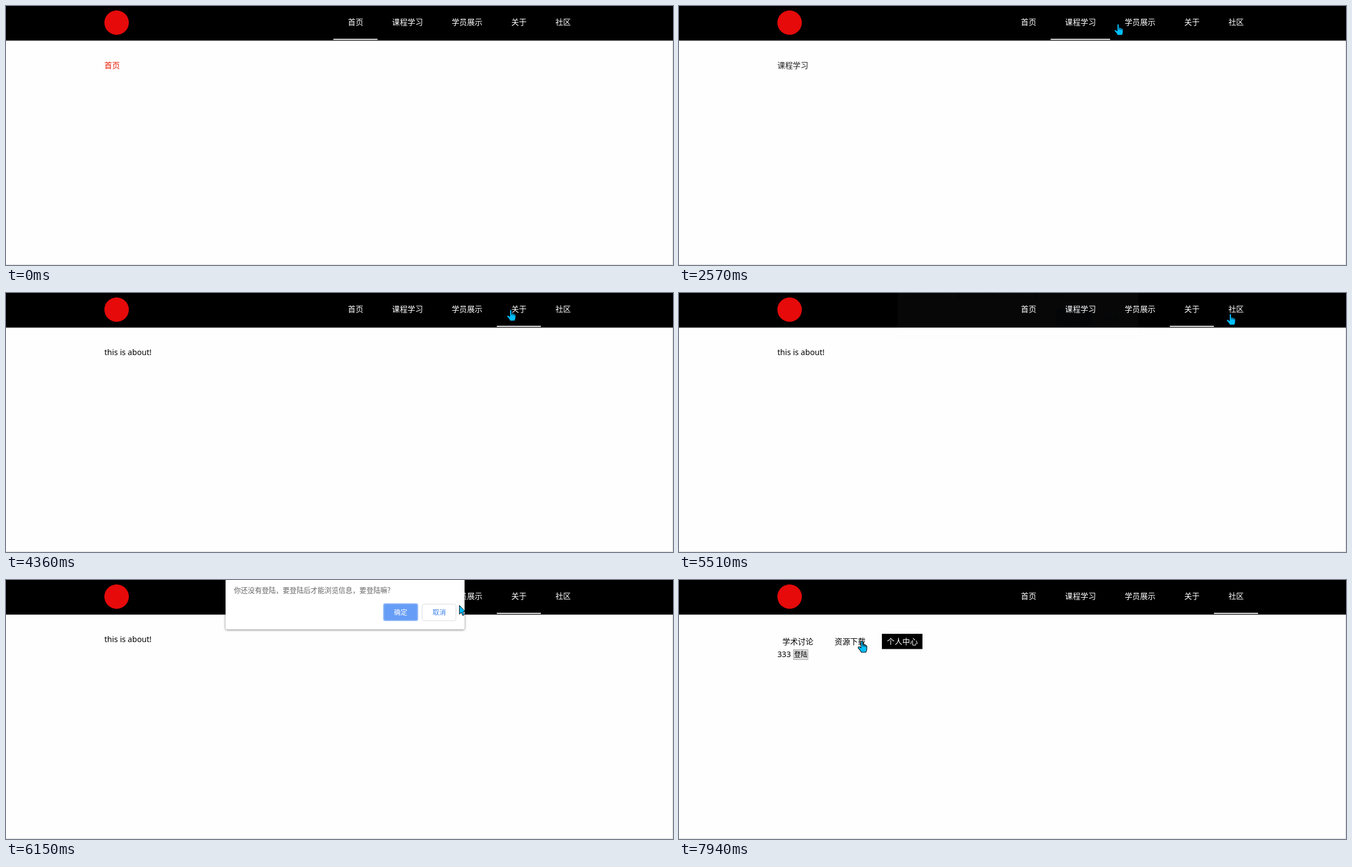
Animation, 1200 px wide and 467 px high, one loop 8 s. Source, as an HTML page:

```html
<!DOCTYPE html>
<html lang="zh-CN">
<head>
<meta charset="utf-8">
<style>
  html, body { margin: 0; width: 100%; height: 100%; overflow: hidden; background: #fefefe; }
  #stage { position: fixed; inset: 0; overflow: hidden; contain: strict; }
  svg { position: absolute; left: 0; top: 0; width: 100%; height: 100%; overflow: hidden; }
  text { font: 14.15px "Noto Sans", "Noto Sans CJK SC", sans-serif; }
  .cjk { font: 13.9px "Noto Sans CJK SC", "Noto Sans CJK", sans-serif; }
  .small { font-size: 12px; }
  .ask { font-size: 12.55px; }
  #dialog { height: 100px; transform-origin: 610px 0; }
  #panel { filter: drop-shadow(0 1px 2px rgba(0, 0, 0, .5)); }
</style>
</head>
<body>
<div id="stage">
<svg>
  <path d="M1199.5 62V466.5H0" fill="none" stroke="#d9d9d9"/>
  <rect width="1200" height="62.4"/>
  <circle cx="199" cy="30" r="22" fill="#e60a0a"/>
  <g id="nav" fill="#fff"></g>
  <rect id="line" y="59.2" height="1.9" fill="#fff"/>
  <g class="page"><text class="cjk" x="177" y="111.5" fill="#e81800">首页</text></g>
  <g class="page"><text class="cjk" x="177" y="111.5" fill="#222">课程学习</text></g>
  <g class="page"><text class="cjk" x="177" y="111.5" fill="#222">学员展示</text></g>
  <g class="page"><text x="177" y="111.5">this is about!</text></g>
  <g class="page">
    <rect x="365" y="97" width="73" height="27.5"/>
    <text class="cjk" x="186" y="116">学术讨论</text>
    <text class="cjk" x="280" y="116">资源下载</text>
    <text class="cjk" x="374" y="116" fill="#fff">个人中心</text>
    <text x="177" y="139">333</text>
    <rect x="206" y="125.5" width="26" height="18" fill="#dedede" stroke="#a6a6a6"/>
    <text class="cjk small" x="207" y="139">登陆</text>
  </g>
</svg>
<svg id="dialog">
  <rect id="panel" x="395" y="-30" width="430" height="119" rx="3" fill="#fff"/>
  <text class="cjk ask" x="410" y="23" fill="#666">你还没有登陆，要登陆后才能浏览信息，要登陆嘛?</text>
  <rect x="679.5" y="43" width="61" height="30" rx="3" fill="#669df6" stroke="#8db5f8" stroke-width="2"/>
  <text class="cjk small" x="698" y="63.3" fill="#fff">确定</text>
  <rect x="748.5" y="43.5" width="61" height="30" rx="3" fill="#fff" stroke="#dadce0"/>
  <text class="cjk small" x="767.5" y="63.3" fill="#3b82ea">取消</text>
</svg>
<svg>
  <g id="cursor" fill="#00bfff" stroke="#000" stroke-linejoin="round">
    <circle id="halo" r="12" fill="#ff0" fill-opacity=".47" stroke="none"/>
    <path id="arrow" d="M.5 .5V16.5L4 13.2L6.4 18.8L9 17.6L6.7 12H11.2Z"/>
    <g id="hand" transform="scale(1.06)">
      <path d="M-1.6 1.6Q0 -.6 1.6 1.6V6.4Q3.2 5.4 4 7.2Q5.8 6.3 6.4 8.2Q8.5 7.6 8.5 10V14Q8.5 17 6.8 19.5H-1Q-2.5 16 -6 12.8Q-7 10.6 -4.8 10.2Q-3 10.6 -1.6 12.2Z"/>
      <path d="M1.6 6V10M4 7.2V10.4M6.4 8.2V10.8" fill="none" stroke-width=".8"/>
    </g>
  </g>
</svg>
</div>
<script>
const LOOP = 8000, STEP = 74;   // pointer and page update in discrete steps
const DIALOG = { open: 5510, shut: 7250, gone: 7320 };
const $ = id => document.getElementById(id);
const pages = [...document.querySelectorAll('.page')];
const pageStarts = [0, 1870, 3030, 4360, 7160];

let left = 589;
const tabs = ['首页', '课程学习', '学员展示', '关于', '社区'].map(label => {
  const tab = { x: left, width: 51.8 + 13.85 * label.length };
  const text = document.createElementNS('http://www.w3.org/2000/svg', 'text');
  text.setAttribute('class', 'cjk');
  text.setAttribute('x', left + 26);
  text.setAttribute('y', 34);
  text.textContent = label;
  $('nav').append(text);
  left += tab.width;
  return tab;
});

// Each leg runs from the previous stop to its own; via bends it, press is a click
const legs = [
  { at: 300, n: 2, from: [966, 324], to: [890, 184] },
  { at: 620, n: 1, to: [821, 148] },
  { at: 840, n: 7, to: [702, 43], via: [650, 70], press: [1540, 1790] },
  { at: 2200, n: 6, to: [790, 32], press: [2800, 3030] },
  { at: 3510, n: 6, to: [908, 29.5], press: [4120, 4270] },
  { at: 4670, n: 6, to: [992, 37], press: [5300, 5510] },
  { at: 5990, n: 10, to: [736.5, 59], via: [626, 52], power: 1, press: [6930, 7080] },
  { at: 7540, n: 3, to: [433, 92] },
  { at: 7940, n: 1, to: [329, 109.5] }
];
legs.forEach((leg, i) => { leg.from ??= legs[i - 1].to; });

function pointer(t, leg) {
  const u = Math.min(1, (1 + Math.floor((t - leg.at) / STEP)) / leg.n);
  const e = 1 - (1 - u) ** (leg.power ?? 2);
  return leg.from.map((a, i) => {
    const b = leg.to[i], c = leg.via ? leg.via[i] : (a + b) / 2;
    return (1 - e) ** 2 * a + 2 * e * (1 - e) * c + e * e * b;
  });
}

const inside = (x, y, x0, y0, x1, y1) => x >= x0 && x < x1 && y >= y0 && y < y1;

function overLink(x, y, view, modal) {
  if (modal) return inside(x, y, 679, 42, 741, 74);
  return inside(x, y, 589, 0, 1042, 62) || view === 4 && inside(x, y, 177, 97, 438, 125);
}

const toggle = (el, on) => { el.style.display = on ? '' : 'none'; };

function drawDialog(t) {
  const shown = t >= DIALOG.open && t < DIALOG.gone;
  toggle($('dialog'), shown);
  if (!shown) return;
  const closing = t >= DIALOG.shut;
  const open = closing ? 0 : Math.min(1, Math.floor((t - DIALOG.open) / 90) / 2);
  const tilt = 1 - open;
  $('dialog').style.opacity = closing ? .975 : .03 + .97 * Math.sqrt(open);
  $('dialog').style.transform = tilt
    ? `matrix3d(1,0,0,0, 0,1,0,${-.00006 * tilt}, 0,0,1,0, 0,${-13.9 * tilt},0,${1 - .0038 * tilt})`
    : 'none';
}

function drawCursor(t, view) {
  const leg = legs.findLast(l => t >= l.at);
  toggle($('cursor'), leg);
  if (!leg) return;
  const [x, y] = pointer(t, leg);
  const link = overLink(x, y, view, t >= DIALOG.open + 90 && t < DIALOG.gone);
  toggle($('hand'), link);
  toggle($('arrow'), !link);
  toggle($('halo'), leg.press && t >= leg.press[0] && t < leg.press[1]);
  $('cursor').setAttribute('transform', `translate(${x} ${y})`);
}

function draw(t) {
  const view = pageStarts.findLastIndex(start => t >= start);
  pages.forEach((page, i) => toggle(page, i === view));
  $('line').setAttribute('x', tabs[view].x);
  $('line').setAttribute('width', tabs[view].width);
  drawDialog(t);
  drawCursor(t, view);
}

const begin = performance.now();
function tick() {
  draw((performance.now() - begin) % LOOP);
  requestAnimationFrame(tick);
}
tick();
</script>
</body>
</html>
```
